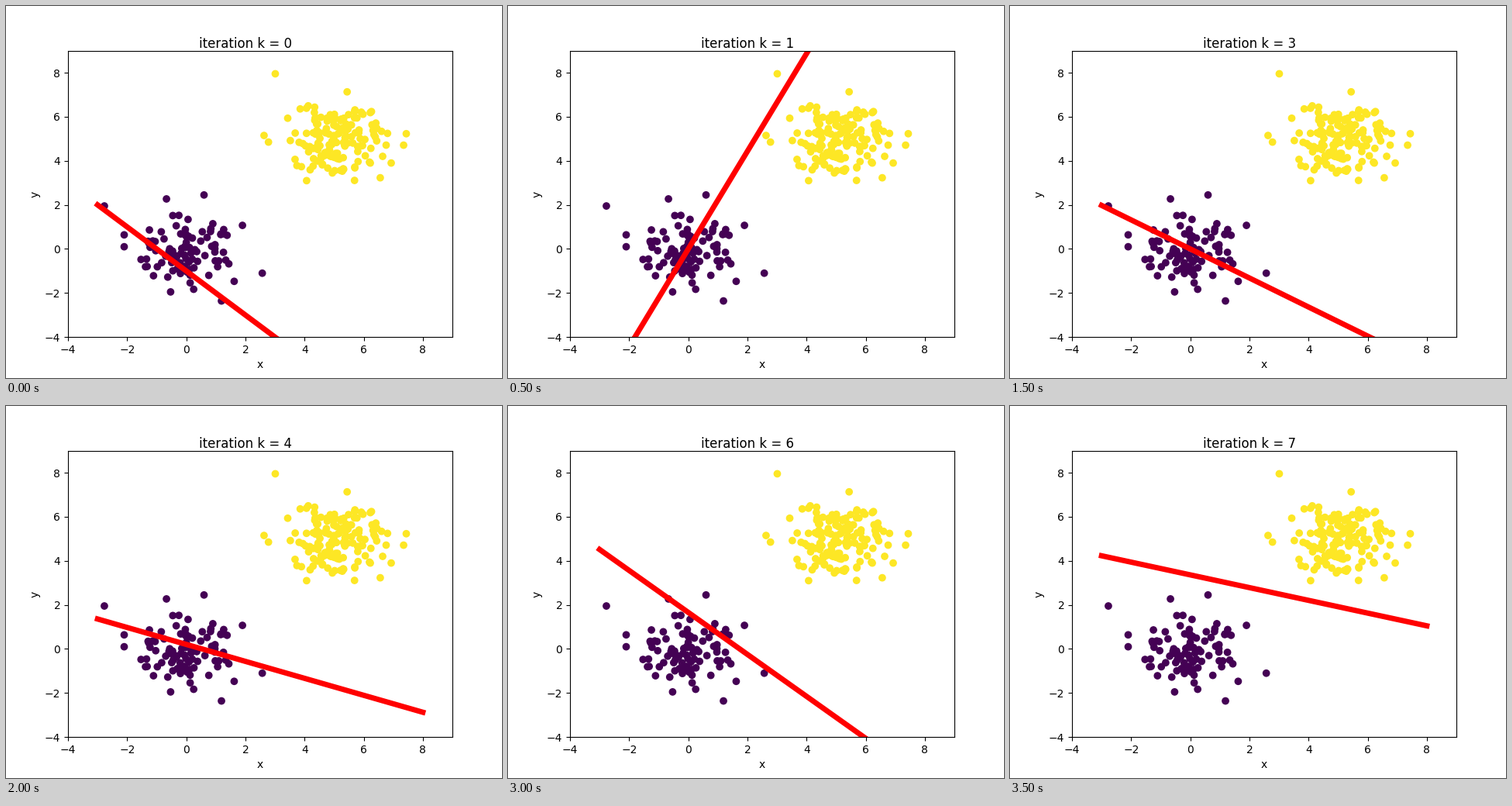
These frames come from a looping animation (640 by 480 pixels, 4 s). A matplotlib script:

```python
import numpy as np
import matplotlib.pyplot as plt
from matplotlib.animation import FuncAnimation

rng = np.random.default_rng(7)

# Misclassified samples in the order they are corrected: x, y, class sign
CORRECTIONS = np.array([
    (1.266, .88, -1), (5.69, 3.11, 1), (2.57, -1.1, -1), (.98, -.54, -1),
    (.82, .79, -1), (-.67, 2.27, -1), (1.38, .62, -1),
])
LOW_OUTLIERS = [
    (-2.77, 1.95), (-2.1, .64), (-2.1, .1), (.6, 2.45), (1.9, 1.07),
    (1.62, -1.47), (1.19, -2.36), (.25, -1.83), (-.53, -1.95),
]
HIGH_OUTLIERS = [
    (3.01, 7.95), (2.63, 5.15), (2.78, 4.85), (7.44, 5.23), (7.35, 4.71),
    (6.93, 3.9), (5.44, 7.13), (6.56, 3.23), (4.07, 3.1),
]


def cluster(n, center, radius, sign, outliers):
    """Normal samples inside a radius, plus the fixed points of one class."""
    core = rng.normal(size=(6 * n, 2))
    core = core[np.hypot(*core.T) < radius][:n]
    fixed = CORRECTIONS[CORRECTIONS[:, 2] == sign, :2]
    return np.vstack((core + center, outliers, fixed))


def train():
    """Perceptron weights (bias, x, y) before and after every correction."""
    weights = [np.ones(3)]
    for x, y, sign in CORRECTIONS:
        weights.append(weights[-1] + sign * np.array([1, x, y]))
    return weights


low = cluster(85, 0, 1.65, -1, LOW_OUTLIERS)
high = cluster(140, 5.05, 1.85, 1, HIGH_OUTLIERS)
labels = np.repeat([0, 1], [len(low), len(high)])
weights = train()

fig, ax = plt.subplots(figsize=(6.4, 4.8), dpi=100)
ax.scatter(*np.vstack((low, high)).T, c=labels, cmap="viridis")
ax.set(xlim=(-4, 9), ylim=(-4, 9), xlabel="x", ylabel="y")
title = ax.text(2, 9, "", fontsize=12, ha="center", va="bottom")
ends = np.array([-3, 8])
line, = ax.plot(ends, ends, color="red", lw=5)


def update(k):
    bias, wx, wy = weights[k]
    line.set_ydata(-(bias + wx * ends) / wy)
    title.set_text(f"iteration k = {k}")
    return line, title


anim = FuncAnimation(fig, update, frames=len(weights), interval=500, repeat=True)
plt.show()
```
